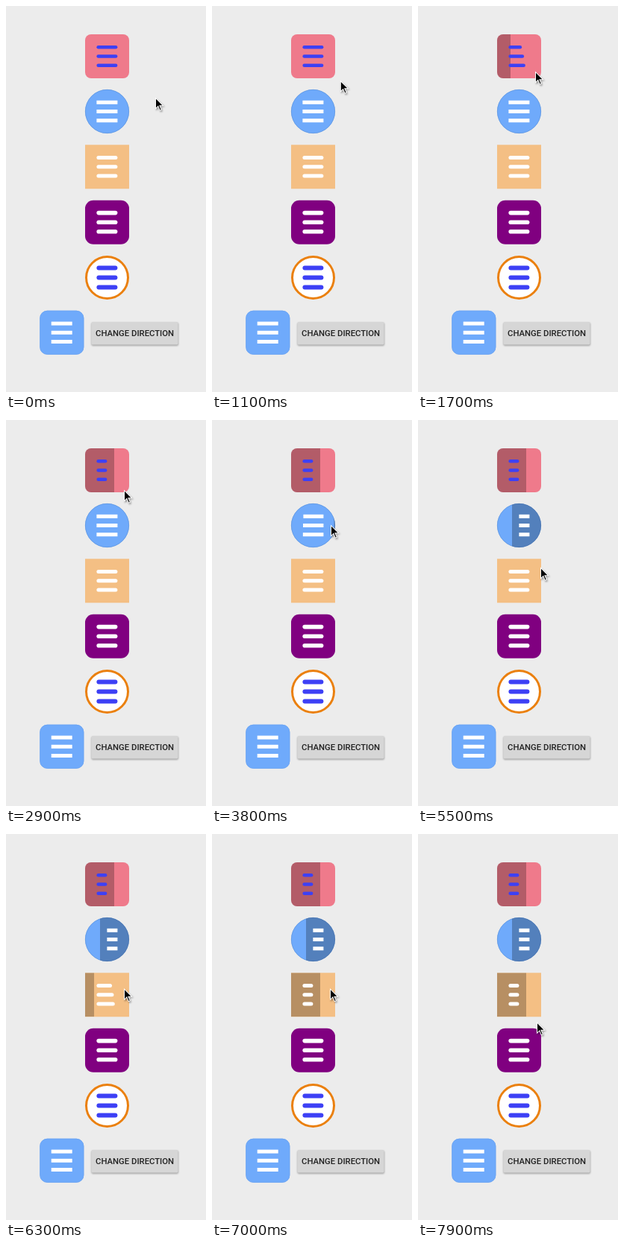
These frames come from a looping animation (268x518 px, 8000 ms). An HTML page:

```html
<!DOCTYPE html>
<html lang="en">
<head>
<meta charset="utf-8">
<title>Menu buttons</title>
<style>
html, body { margin: 0; width: 100%; height: 100%; overflow: hidden; background: #ececec; }
svg { display: block; }
text { font: 500 11.3px Roboto, Arial, sans-serif; fill: #222; }
</style>
</head>
<body>
<svg id="stage" width="268" height="518" viewBox="0 0 268 518">
  <defs>
    <filter id="soft" x="-20%" y="-20%" width="150%" height="150%"><feGaussianBlur stdDeviation="1"/></filter>
  </defs>
  <g id="buttons"></g>
  <rect x="114.5" y="425" width="116.5" height="31" rx="2" fill="#000" opacity=".3" filter="url(#soft)"/>
  <rect x="114.5" y="424" width="116" height="30.5" rx="2" fill="#d6d6d6"/>
  <text x="172.6" y="443" text-anchor="middle">CHANGE DIRECTION</text>
  <g id="cursor">
    <path d="M1 2V18L5 15L7 20L10 19L8 13H13Z" opacity=".35" filter="url(#soft)"/>
    <path d="M0 0V16.3L3.7 12.8L6 18.2L9 17L6.8 11.8H11.8Z" fill="#fff"/>
    <path d="M1 2.3V13.9L4 11.1L6.5 16.9L7.7 16.4L5.2 10.7H9.4Z"/>
  </g>
</svg>
<script>
const LOOP = 8000, STEP = 100, SIZE = 59;
const NS = 'http://www.w3.org/2000/svg';
const LINE_TIMES = [290, 370, 440], PANEL_TIME = 400;
const FULL = 28, PANEL = 39;

const buttons = [
  { x: 106, y: 38, r: 8, fill: '#ef7a8b', ink: '#3d40f5', thick: 4.6, gap: 12.2, round: true, open: 1510 },
  { x: 106, y: 112, r: 29.5, fill: '#6faafb', ink: '#fff', thick: 5, gap: 12.2, open: 3750, right: true, edge: '#5f95dd' },
  { x: 106, y: 186.3, r: 0, fill: '#f4bf84', ink: '#fff', thick: 5, gap: 12.2, round: true, open: 6150 },
  { x: 106, y: 260.7, r: 11, fill: '#800080', ink: '#fff', thick: 5.6, gap: 12.6, round: true },
  { x: 106, y: 335, r: 29.5, fill: '#fff', ink: '#3d40f5', thick: 6, gap: 13, round: true, edge: '#ea800f', border: 3 },
  { x: 45.3, y: 408.8, r: 10, fill: '#6faafb', ink: '#fff', thick: 5, gap: 12.2, edge: '#6aa3f0' }
];

// time, x, y of the pointer tip
const path = [
  [0, 200, 122.5], [800, 200, 122.5], [1300, 157, 87.5],
  [2800, 157, 87.5], [2900, 158, 93.5], [3300, 159, 140.5],
  [5000, 159, 140.5], [5500, 164, 197.5], [5800, 158, 207],
  [7400, 158, 207], [7900, 159, 252], [8000, 159, 252]
];

const ease = p => (1 - Math.cos(Math.PI * Math.min(1, Math.max(0, p)))) / 2;

function add(parent, name, attrs) {
  const el = document.createElementNS(NS, name);
  for (const key in attrs) el.setAttribute(key, attrs[key]);
  return parent.appendChild(el);
}

function build(b, i) {
  const root = document.getElementById('buttons');
  const shape = { x: b.x, y: b.y, width: SIZE, height: SIZE, rx: b.r };
  const clip = add(root, 'clipPath', { id: 'clip' + i });
  add(clip, 'rect', shape);
  add(root, 'rect', { ...shape, fill: b.fill });
  if (b.edge) {
    const w = b.border || 0.7;
    add(root, 'rect', {
      x: b.x + w / 2, y: b.y + w / 2, width: SIZE - w, height: SIZE - w,
      rx: b.r - w / 2, fill: 'none', stroke: b.edge, 'stroke-width': w
    });
  }
  b.panel = add(root, 'rect', {
    x: b.x, y: b.y, width: 0, height: SIZE, opacity: 0.25, 'clip-path': `url(#clip${i})`
  });
  b.lines = [-1, 0, 1].map(n => add(root, 'rect', {
    x: b.x + 15.4, y: b.y + SIZE / 2 + n * b.gap - b.thick / 2,
    width: FULL, height: b.thick, rx: b.round ? b.thick / 2 : 0, fill: b.ink
  }));
}

function slide(b, t) {
  const w = PANEL * ease((t - b.open) / PANEL_TIME);
  b.panel.setAttribute('width', w);
  if (b.right) b.panel.setAttribute('x', b.x + SIZE - w);
  b.lines.forEach((line, i) => {
    const cut = FULL / 2 * ease((t - b.open) / LINE_TIMES[i]);
    line.setAttribute('width', FULL - cut);
    if (b.right) line.setAttribute('x', b.x + 15.4 + cut);
  });
}

function pointer(t) {
  const i = path.findIndex(p => p[0] > t);
  const [t0, x0, y0] = path[i - 1], [t1, x1, y1] = path[i];
  const p = ease((t - t0) / (t1 - t0));
  return [x0 + (x1 - x0) * p, y0 + (y1 - y0) * p];
}

function draw(now) {
  const t = Math.floor((now % LOOP) / STEP) * STEP;
  buttons.forEach(b => { if (b.open) slide(b, t); });
  document.getElementById('cursor').setAttribute('transform', `translate(${pointer(t)})`);
}

const start = performance.now();
function tick() {
  draw(performance.now() - start);
  requestAnimationFrame(tick);
}
buttons.forEach(build);
tick();
</script>
</body>
</html>
```
